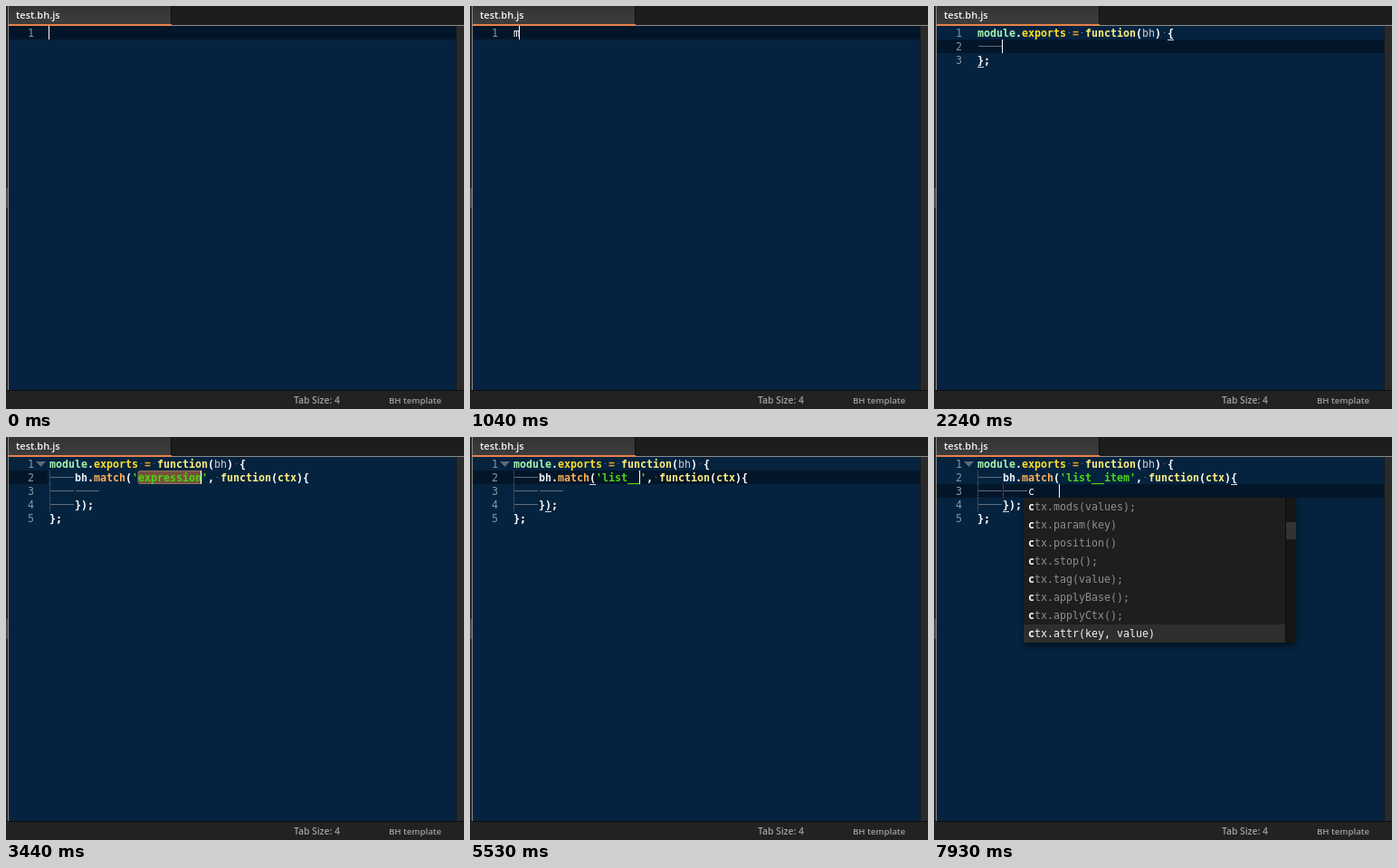
These frames come from a looping animation (506 by 445 pixels, 8000 ms). An HTML page with a canvas:

```html
<!DOCTYPE html>
<html lang="en">
<head>
<meta charset="utf-8">
<title>Editor snippets</title>
<style>
html, body { margin: 0; width: 100%; height: 100%; overflow: hidden; background: #05233f; }
canvas { display: block; width: 506px; height: 445px; }
</style>
</head>
<body>
<canvas id="stage" width="506" height="445"></canvas>
<script>
const g = document.getElementById('stage').getContext('2d');
const LOOP = 8000, X0 = 48, Y0 = 22, CW = 7, LH = 15, ROW = 20;
const MONO = '11.63px "DejaVu Sans Mono", monospace';
const UI = '"Open Sans", "Noto Sans", sans-serif';
const WHITE = '#ffffff', GREEN = '#a5f5ae', GOLD = '#ffdd2a', CREAM = '#ffee80',
  ORANGE = '#ff9d1e', AMBER = '#ffb054', STRING = '#4bd510', PARAM = '#cccccc', DIM = '#5f6e7a';

const colX = c => X0 + c * CW;
const lineY = n => Y0 + n * LH;

function box(x, y, w, h, color) {
  g.fillStyle = color;
  g.fillRect(x, y, w, h);
}

function write(s, x, y, color, font) {
  g.font = font;
  g.fillStyle = color;
  g.fillText(s, x, y);
}

// Documents: each line is { indent, parts: [text, color, bold] }
const line = (indent, ...parts) => ({ indent, parts });
const fn = arg => [['function', CREAM, 1], ['(', WHITE, 1], [arg, PARAM], [')', WHITE, 1]];
const head = line(0, ['module', GREEN, 1], ['.', WHITE, 1], ['exports', GOLD, 1], [' ', WHITE],
  ['=', ORANGE, 1], [' ', WHITE], ...fn('bh'), [' {', WHITE, 1]);
const close = line(0, ['};', WHITE, 1]);
const plain = (indent, s) => s ? line(indent, [s, WHITE]) : line(indent);
const bare = s => [plain(0, s)];
const wrap = s => [head, plain(1, s), close];
const match = (name, s) => [
  head,
  line(1, ['bh', '#e8eef4', 1], ['.', WHITE, 1], ['match', AMBER, 1], ['(', WHITE, 1],
    ["'" + name + "'", STRING, 1], [', ', WHITE, 1], ['function', CREAM, 1], ['(', WHITE, 1],
    ['ctx', CREAM, 1], [')', WHITE, 1], ['{', WHITE, 1]),
  plain(2, s),
  line(1, ['});', WHITE, 1]),
  close
];

// Completion lists
const nList = {
  x: 43, y: 37, w: 301, hit: /^n|N/, pick: 0, thumb: [0, 33],
  rows: ['null', 'modName', 'content({ elem: elemName });', 'content([{ elem: elemName }]);',
    'content({ elem: elemName }, force);', 'content([{ elem: elemName }], force);',
    'content({ block: blockName });', 'content([{ block: blockName }]);']
};
const moList = pick => ({
  x: 43, y: 37, w: 301, hit: /^mo/, pick, thumb: [0, 80],
  rows: ['mod(key)', 'mods(values);', 'module.exports', 'mod(key, value)',
    'mods(values, force);', 'modName', 'modVal', 'mod(key, value, force)']
});
const bhList = {
  x: 71, y: 52, w: 324, hit: /^bh/, pick: 0,
  rows: ["bh.match('expression', function(ctx){});"]
};
const cList = {
  x: 99, y: 67, w: 301, hit: /^c/, pick: 7, thumb: [27, 19],
  rows: ['ctx.mods(values);', 'ctx.param(key)', 'ctx.position()', 'ctx.stop();',
    'ctx.tag(value);', 'ctx.applyBase();', 'ctx.applyCtx();', 'ctx.attr(key, value)']
};

// Timeline: each step holds until the next one
const steps = [];
const at = (t, doc, row, col, more) => steps.push({ t, doc, row, col, caret: 1, marks: [], ...more });
const outer = { marks: [[0, 30], [2, 0]] };

at(0, bare(''), 0, 0);
at(300, bare(''), 0, 0, { caret: .5 });
at(450, bare('n'), 0, 1);
at(600, bare('n'), 0, 1, { pop: nList });
at(900, bare(''), 0, 0);
at(1040, bare('m'), 0, 1);
at(1340, bare('mo'), 0, 2);
at(1490, bare('mo'), 0, 2, { pop: moList(3) });
at(1640, bare('mo'), 0, 2, { pop: moList(2) });
at(1940, wrap(''), 1, 4, outer);
at(2540, wrap(''), 1, 4, { ...outer, caret: .5 });
at(2690, wrap('b'), 1, 5, outer);
at(2840, wrap('bh'), 1, 6, outer);
at(2990, wrap('bh'), 1, 6, { ...outer, pop: bhList });
[[3290, 1], [4040, .7], [4190, .4], [4340, .15], [4490, 0]].forEach(([t, caret]) =>
  at(t, match('expression', ''), 1, 24, { caret, sel: [14, 24] }));
[[4640, 1], [4790, 2], [4930, 3], [5080, 4], [5380, 5], [5530, 6], [5680, 7], [5830, 9], [6130, 10]]
  .forEach(([t, n]) => at(t, match('list__item'.slice(0, n), ''), 1, 14 + n, { marks: [[1, 12], [3, 5]] }));
const inner = { marks: [[1, 40], [3, 4]] };
[[6580, 1], [6880, .65], [7030, .3], [7180, 0], [7330, .3], [7480, .65], [7630, 1]].forEach(([t, caret]) =>
  at(t, match('list__item', ''), 2, 12, { ...inner, caret }));
at(7780, match('list__item', 'c'), 2, 13, inner);
at(7930, match('list__item', 'c'), 2, 13, { ...inner, pop: cList });

function drawFrame() {
  box(0, 0, 506, 445, '#05233f');
  box(0, 0, 506, 22, '#1d1d1d');
  const tab = g.createLinearGradient(0, 0, 0, 20);
  tab.addColorStop(0, '#333333');
  tab.addColorStop(1, '#3d3d3d');
  box(3, 0, 179, 20, tab);
  box(182, 0, 1, 20, '#0c0c0c');
  box(183, 21, 323, 1, '#8b8b8b');
  box(3, 20, 180, 2, '#e8824a');
  write('test.bh.js', 11, 14, '#f4f4f4', '600 11px ' + UI);
  box(497, 22, 9, 403, '#2a2a2a');
  box(497, 22, 1, 403, '#151a20');
  box(0, 0, 2, 425, '#242424');
  box(0, 201, 2, 22, '#484848');
  box(2, 0, 1, 425, '#8b8b8b');
  box(0, 424, 506, 21, '#222222');
  box(0, 424, 506, 1, '#0e0e0e');
  write('Tab Size: 4', 318, 439, '#a0a0a0', '600 10.3px ' + UI);
  write('BH template', 423, 439, '#a0a0a0', '600 9.6px ' + UI);
}

function drawLine({ indent, parts }, n) {
  const y = lineY(n);
  const guides = indent - (parts.length ? 0 : 1);
  for (let k = 0; k < indent; k++) {
    const x = colX(k * 4);
    box(x + 1, y + 7, 26, 1, DIM);
    if (k < guides) for (let d = 0; d < LH; d += 2) box(x, y + d, 1, 1, DIM);
  }
  let col = indent * 4;
  for (const [s, color, bold] of parts) {
    write(s, colX(col), y + 12, color, (bold ? 'bold ' : '') + MONO);
    [...s].forEach((ch, i) => { if (ch === ' ') box(colX(col + i) + 3, y + 7, 1, 1, '#7d8790'); });
    col += s.length;
  }
  write(String(n + 1), 24, y + 12, '#89949d', MONO);
}

function drawPopup({ x, y, w, hit, pick, thumb, rows }) {
  const h = rows.length * ROW, listW = thumb ? w - 12 : w;
  g.save();
  g.shadowColor = 'rgba(0,0,0,.5)';
  g.shadowBlur = 7;
  g.shadowOffsetY = 4;
  box(x, y, w, h, '#1e1e1e');
  g.restore();
  box(x, y + pick * ROW, listW, ROW, '#2e2e2e');
  if (thumb) {
    box(x + listW, y, 12, h, '#161616');
    box(x + listW, y, 1, h, '#0c0c0c');
    box(x + listW + 1, y + thumb[0], 11, thumb[1], '#333333');
  }
  rows.forEach((s, i) => {
    const m = s.match(hit), end = m.index + m[0].length, base = y + i * ROW + 14;
    const color = i === pick ? '#f2f2f2' : '#8e8e8e';
    const put = (part, c, tone, font) => write(part, x + 5 + c * CW, base, tone, font);
    put(s.slice(0, m.index), 0, color, MONO);
    put(m[0], m.index, WHITE, 'bold ' + MONO);
    put(s.slice(end), end, color, MONO);
  });
}

function draw(now) {
  const t = now % LOOP;
  const s = steps.filter(step => step.t <= t).pop();
  drawFrame();
  box(3, lineY(s.row), s.sel ? 43 : 494, LH, '#031629');
  if (s.sel) {
    const x = colX(s.sel[0]), w = (s.sel[1] - s.sel[0]) * CW;
    g.beginPath();
    g.roundRect(x, lineY(s.row) + .5, w, LH - 1, 2);
    g.fillStyle = '#77513a';
    g.fill();
    g.strokeStyle = '#8c7363';
    g.lineWidth = 1;
    g.stroke();
  }
  s.doc.forEach(drawLine);
  if (s.doc.length === 5) {
    g.fillStyle = '#5d6a72';
    g.beginPath();
    g.moveTo(33, 27);
    g.lineTo(44, 27);
    g.lineTo(38.5, 33);
    g.fill();
  }
  s.marks.forEach(([n, c]) => box(colX(c), lineY(n) + LH, CW, 1, '#d5dade'));
  g.globalAlpha = s.caret;
  box(colX(s.col) - 1, lineY(s.row), 1, LH, WHITE);
  g.globalAlpha = 1;
  if (s.pop) drawPopup(s.pop);
}

const start = performance.now();
function tick() {
  draw(performance.now() - start);
  requestAnimationFrame(tick);
}
tick();
</script>
</body>
</html>
```
